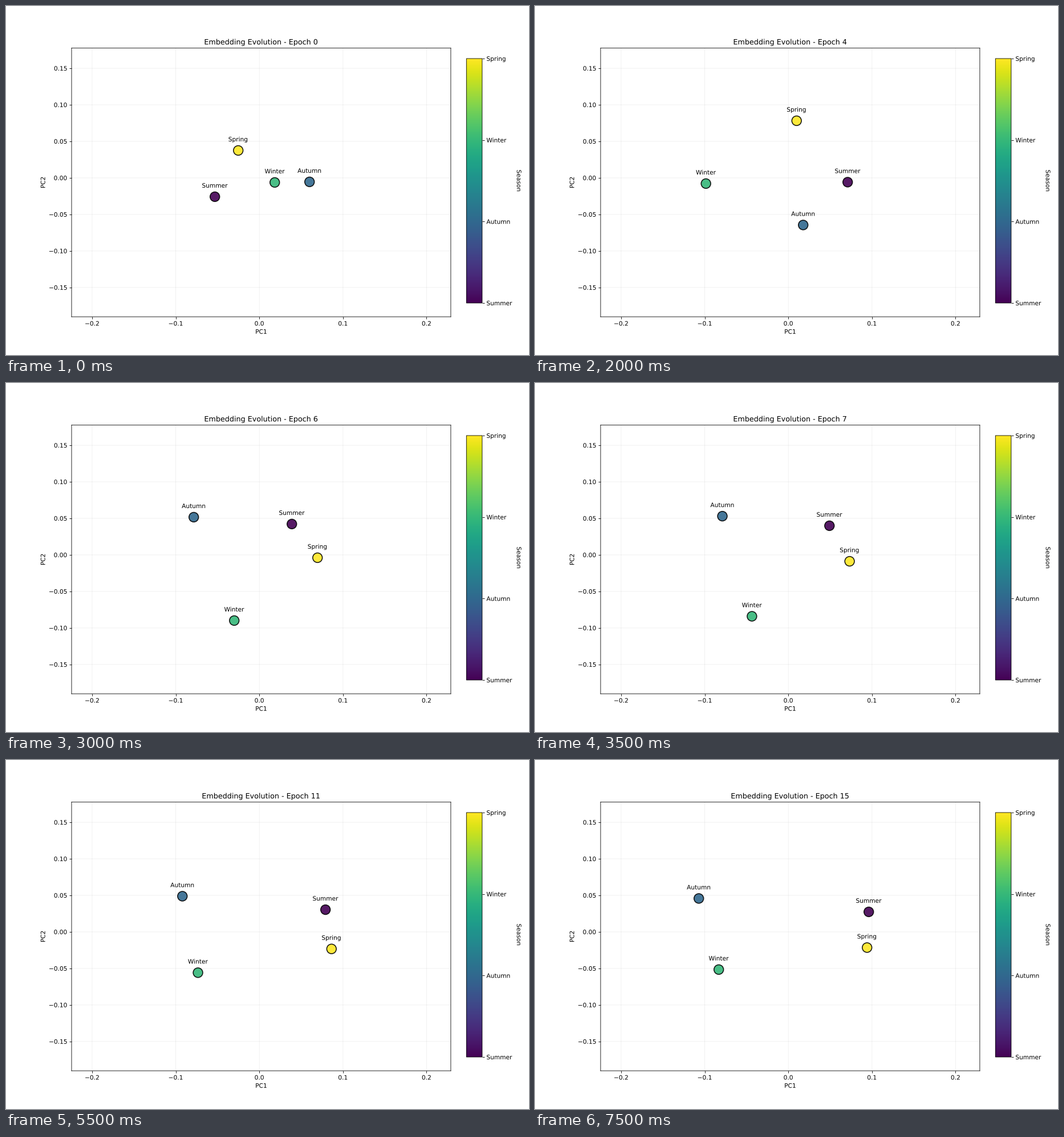
Animation, 917 px wide and 611 px high, one loop 8 s. Source, as a matplotlib script:

```python
import numpy as np
import matplotlib.pyplot as plt
from matplotlib.animation import FuncAnimation
from matplotlib.cm import ScalarMappable
from matplotlib.colors import Normalize
from matplotlib.patheffects import Normal
from matplotlib.text import Text

W, H, DPI = 917, 611, 76.4
EPS = 1e-6                 # keeps the pixel size from being truncated
ORIGIN = 444.2, 300.9      # pixel position of data (0, 0)
SCALE = 1466.0, -1279.0    # pixels per data unit
PLOT = 115.0, 73.7, 779.9, 544.1    # left, top, right, bottom in pixels
BAR = 807.3, 92.0, 834.9, 520.0

EPOCHS = 16
MIRRORED = 2   # the sign of PC1 is arbitrary and flips at this epoch
SEASONS = ["Summer", "Autumn", "Winter", "Spring"]

# Key poses as pixel offsets x + yj (y down): Summer, Winter, Spring.
POSES = {
    0: [-78 + 33j, 27 + 8j, -37 - 48j],
    2: [73 - 34j, -76 + 54j, -90 - 46.5j],
    4: [104 + 7.5j, -144.5 + 10j, 14.5 - 100j],
    6: [57 - 54j, -44 + 115j, 102 + 5j],
    9: [102 - 35j, -99 + 82.5j, 117 + 25.5j],
    13: [130 - 42.5j, -115 + 59.5j, 136 + 34.5j],
    15: [141 - 35j, -122 + 66j, 138 + 27.5j],
}
KEY_EPOCHS = list(POSES)
KEYS = np.array(list(POSES.values()))
RADII = np.abs(KEYS)
ANGLES = np.unwrap(np.angle(KEYS), axis=0)


def between(epoch, values):
    return np.array([np.interp(epoch, KEY_EPOCHS, v) for v in values.T])


def positions(epoch):
    """Swing each season around the origin from key to key."""
    z = between(epoch, RADII) * np.exp(1j * between(epoch, ANGLES))
    summer, winter, spring = z
    z = np.array([summer, -z.sum(), winter, spring])  # mean-centred
    side = -1 if epoch == MIRRORED else 1
    return np.column_stack([side * z.real, z.imag]) / SCALE


def add_axes(left, top, right, bottom):
    return fig.add_axes([left / W, 1 - bottom / H,
                         (right - left) / W, (bottom - top) / H])


def limits(axis, low, high):
    return [(p - ORIGIN[axis]) / SCALE[axis] for p in (low, high)]


plt.rcParams.update({"font.family": "DejaVu Sans", "path.snap": False})
fig = plt.figure(figsize=((W + EPS) / DPI, (H + EPS) / DPI), dpi=DPI)

ax = add_axes(*PLOT)
ax.set_xlim(limits(0, PLOT[0], PLOT[2]))
ax.set_ylim(limits(1, PLOT[3], PLOT[1]))
ax.set_xticks(np.arange(-2, 3) / 10)
ax.set_yticks(np.arange(-3, 4) / 20)
ax.grid(alpha=0.2)
ax.set_xlabel("PC1")
ax.set_ylabel("PC2")
title = ax.set_title("")

norm = Normalize(0, 3)
start = positions(0)
dots = ax.scatter(start[:, 0], start[:, 1], c=range(4), cmap="viridis",
                  norm=norm, s=250, alpha=0.9, edgecolors="black",
                  linewidths=1.5, zorder=3)
labels = [ax.annotate(name, xy, xytext=(0, 15), textcoords="offset points",
                      ha="center", zorder=4)
          for name, xy in zip(SEASONS, start)]

bar = fig.colorbar(ScalarMappable(norm, "viridis"), cax=add_axes(*BAR),
                   ticks=range(4))
bar.ax.set_yticklabels(SEASONS)
bar.set_label("Season", rotation=270, labelpad=15)

# Draw glyphs as outlines so that text is not pinned to whole pixels.
fig.draw_without_rendering()
for text in fig.findobj(Text):
    text.set_path_effects([Normal()])


def update(epoch):
    points = positions(epoch)
    dots.set_offsets(points)
    for label, xy in zip(labels, points):
        label.xy = xy
    title.set_text(f"Embedding Evolution - Epoch {epoch}")
    return [dots, title, *labels]


anim = FuncAnimation(fig, update, frames=EPOCHS, interval=500,
                     repeat=True, repeat_delay=0, blit=False)
plt.show()
```
